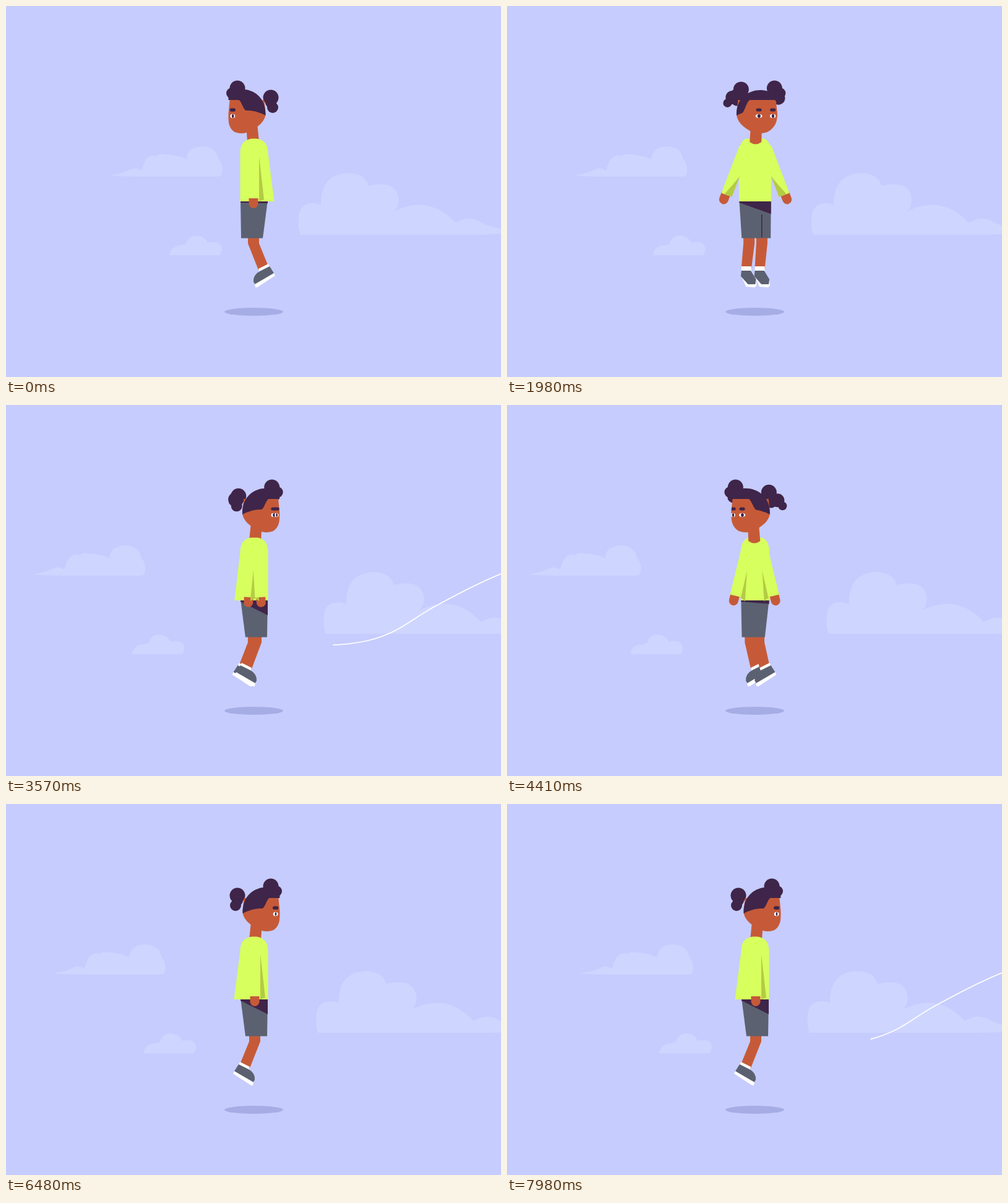
Recreate the animation shown at these times as an HTML page with a canvas. Size 800x600 px, loop 8 s.

```html
<!DOCTYPE html>
<html lang="en">
<head>
<meta charset="utf-8">
<title>Spin</title>
<style>
  html, body { margin: 0; width: 100%; height: 100%; overflow: hidden; background: #c6ccfd; }
  svg, canvas { position: absolute; left: 0; top: 0; width: 800px; height: 600px; }
  .cloud { fill: #ced5ff; }
  .swoosh { fill: none; stroke: #fff; stroke-width: 1.7; visibility: hidden; }
</style>
</head>
<body>
<svg viewBox="0 0 800 600">
  <path class="cloud" data-shift="-134" data-back="85" d="M166 274Q190 271 202 264Q209 260 219 266Q225 243 235 242Q241 241 245 243Q244 238 258 240Q278 241 292 248Q292 228 318 227Q341 229 343 247Q352 256 349 271Q348 276 341 276H215Q190 276 166 274Z"/>
  <path class="cloud" data-shift="-65" data-back="-47" d="M264 403Q267 387 284 387L291 385Q294 372 307 371Q322 372 326 383Q349 378 349 395L346 403Z"/>
  <path class="cloud" data-shift="44" data-back="31" d="M475 370Q465 320 494 319Q502 318 509 323Q507 272 554 270Q580 271 586 291Q632 280 635 314Q634 326 627 332Q684 304 727 351Q748 337 768 350Q790 361 826 364Q800 370 735 370Z"/>
  <ellipse cx="400.5" cy="494.5" rx="47.5" ry="6.5" fill="#a6ade5"/>
</svg>
<canvas width="800" height="600"></canvas>
<svg viewBox="0 0 800 600">
  <path class="swoosh" id="hill" d="M0 322C45 297 90 282 134 283C175 284 195 292 225 310C265 333 310 356 385 373C440 386 520 396 585 381C640 367 655 345 700 322C735 303 765 287 800 273"/>
  <path class="swoosh" id="loop" d="M0 506C60 503 120 495 162 478C200 462 219 445 219 422C217 400 200 389 182 389C155 390 133 412 133 436C134 455 148 468 162 478C210 505 265 516 330 516C450 515 590 475 677 418C730 385 770 350 800 310"/>
</svg>
<script>
const LOOP = 8000, STEP = 30, HALF_TURN = 24, CX = 401;
const SKIN = '#c65a38', HAIR = '#3f2549', SHIRT = '#d7ff5e', SHADE = '#b4cb45',
      SHORTS = '#5b6170', WHITE = '#fff', SOLE = '#eaa875', SKY = '#c6ccfd';
const ctx = document.querySelector('canvas').getContext('2d');
const clouds = document.querySelectorAll('.cloud');

const clamp = (v, lo = 0, hi = 1) => Math.max(lo, Math.min(hi, v));
const mix = (a, b, k) => a + (b - a) * k;
const smooth = v => { const k = clamp(v); return k * k * (3 - 2 * k); };

function fill(color) { ctx.fillStyle = color; ctx.fill(); }
function poly(color, ...pts) {
  ctx.beginPath();
  pts.forEach(([x, y]) => ctx.lineTo(x, y));
  ctx.closePath();
  fill(color);
}
function oval(color, x, y, rx, ry = rx) {
  ctx.beginPath();
  ctx.ellipse(x, y, rx, ry, 0, 0, 7);
  fill(color);
}
function pill(color, x, y, w, h, r) {
  ctx.beginPath();
  ctx.roundRect(x, y, w, h, r);
  fill(color);
}
function place(x, y, flip, draw) {
  ctx.save();
  ctx.translate(x, y);
  ctx.scale(flip, 1);
  draw();
  ctx.restore();
}

// A short rest in profile, a snap out of it, then a steady turn
function turnAngle(half) {
  if (half < 3) return 35 * clamp(half - 2);
  return half < 15 ? mix(35, 90, (half - 3) / 12) : mix(90, 180, (half - 15) / 9);
}

function pose(frame) {
  const phase = frame % (2 * HALF_TURN), half = phase % HALF_TURN;
  const yaw = (turnAngle(half) + (phase < HALF_TURN ? -90 : 90)) * Math.PI / 180;
  const flat = Math.abs(Math.cos(yaw)), side = Math.sin(yaw);
  return {
    yaw, flat, side,
    broad: flat ** 4,
    lead: Math.sign(side) || 1,
    front: Math.cos(yaw) > -.01,
    reach: 57 * flat + 22 * Math.sin(Math.PI * clamp((half - 3) / 12)),
    wedge: 3 + 21 * clamp(phase / 22) * clamp((48 - phase) / 6)
  };
}

function sideShoe() {
  poly(WHITE, [-8, -5], [8, 3], [6, 9], [-10, 0]);
  ctx.beginPath();
  ctx.moveTo(-10, -1);
  ctx.lineTo(6, 7);
  ctx.quadraticCurveTo(17, 13, 16, 24);
  ctx.lineTo(13, 29);
  ctx.lineTo(-17, 10);
  fill(SHORTS);
  poly(WHITE, [-17, 10], [14, 28], [13, 33], [10, 33], [-19, 14]);
}
function frontShoe(lean) {
  poly(WHITE, [-8, -1], [8, -1], [8, 7], [-8, 7]);
  poly(WHITE, [-9, 13], [lean - 7, 32], [lean + 7, 33], [lean + 10, 30], [lean + 9, 21]);
  poly(SHORTS, [-8, 6], [7, 6], [lean + 9, 20], [lean + 8, 28], [lean - 4, 28], [-9, 15]);
}
function backShoe(lean) {
  poly(WHITE, [-9, 1], [9, 1], [9, 9], [-9, 9]);
  poly(SHORTS, [-10, 7], [9, 7], [11, 14], [lean - 12, 27]);
  poly(WHITE, [-8, 14], [9, 11], [11, 15], [lean + 7, 33], [lean - 11, 34], [lean - 12, 30]);
  poly(SOLE, [-4, 15], [7, 15], [8, 18], [lean + 4, 32], [lean - 10, 33], [lean - 10, 29]);
}

function drawLegs({ flat, side, lead, front }) {
  const swing = CX - side * (6 + 9 * side ** 4);
  for (const leg of flat < .05 ? [0] : [-1, 1]) {
    const top = CX + side + 12 * flat * leg, foot = swing + 12.5 * flat * leg;
    poly(SKIN, [top - 9, 373], [top + 9, 373], [top + 9, 384], [foot + 8, 424 + 3 * side],
      [foot - 8, 424 - 3 * side], [top - 9, 384]);
    if (flat < .7) place(foot, 422, lead, sideShoe);
    else place(foot, 422, 1, () => (front ? frontShoe : backShoe)(side * 13));
  }
}

function drawShorts({ flat, broad, side, front, wedge }) {
  const waist = 22 + 6.5 * broad, hem = 17.5 + 10.5 * broad, mid = CX + 3.5 * side, bottom = 375.5;
  const l = CX - waist, r = CX + waist;
  poly(SHORTS, [l, 314], [r, 314], [mid + hem, bottom], [mid - hem, bottom]);
  if (flat > .97) {
    pill(HAIR, 396.5, 336, 4, 9, 0);
    pill(SKY, 396.5, 344, 4, bottom - 343, 0);
  } else if (flat > .7) {
    pill(HAIR, CX + side * (front ? 20 : -12), 337, 1.5, 37, 0);
  }
  poly(HAIR, [l, 316], [r, 316], [r, 316 + wedge], [l, 318]);
}

function drawNeck({ side }) {
  const top = CX + 4 * side, base = CX + 1.5 * side;
  ctx.beginPath();
  ctx.moveTo(top - 9, 190);
  ctx.lineTo(top + 9, 190);
  ctx.lineTo(base + 9.5, 220);
  ctx.quadraticCurveTo(base, 227, base - 9.5, 220);
  fill(SKIN);
}

function drawTorso({ flat, broad, side }) {
  const half = 22.5 + 6 * broad, flare = 10 * clamp((Math.abs(side) - .8) / .2);
  const l = CX - half, r = CX + half, collar = 16 * flat;
  ctx.beginPath();
  ctx.moveTo(l - (side > 0 ? flare : 0), 316);
  ctx.lineTo(l, 238);
  ctx.bezierCurveTo(l, 222, l + 8, 214.5, CX - collar, 214.5);
  ctx.lineTo(CX + collar, 214.5);
  ctx.bezierCurveTo(r - 8, 214.5, r, 222, r, 238);
  ctx.lineTo(r + (side < 0 ? flare : 0), 316);
  fill(SHIRT);
}

function onArm(arm, { flat, side, reach }, draw) {
  const shoulder = 20 * flat;
  place(CX + arm * shoulder + side, 229, arm, () => {
    ctx.rotate(-Math.asin(clamp((reach - shoulder) / 90, -1, 1)));
    draw(flat);
  });
}
function sleeve(flat) {
  if (flat < .05) poly(SHADE, [9, 14], [17, 84], [9, 87]);
  else if (flat < .7) poly(SHADE, [-7, 30], [-7, 82], [-17, 87]);
  poly(SHIRT, [-8, 0], [3, -11], [9, 1], [9, 82], [-9, 82]);
  if (flat >= .7) poly(SHADE, [-9, 46], [-3, 64], [4, 82], [-9, 82]);
}
function hand(flat) {
  pill(SKIN, 2 * flat - 7.5, 80, 15, 18, [0, 0, 7.5, 7.5]);
}

function drawBuns({ flat, broad, side, lead }) {
  const drift = 10 * side * flat, spread = clamp(Math.abs(side) * flat / .43);
  for (const s of [-1, 1]) {
    const trailing = s !== lead;
    const x = CX + 27 * s + drift, y = 133 + (trailing ? 15 * Math.abs(side) ** 3 : 0);
    oval(HAIR, x, y, 12.5);
    oval(HAIR, x + 9 * s * (trailing ? flat : 1), y + 8, 9);
    oval(HAIR, x + s * (3 + 6 * broad), y + 16, 9 + 3 * broad);
    if (trailing) {
      oval(HAIR, x + 14 * s * spread, y + 13 * spread, 11);
      oval(HAIR, x + 22 * s * spread, y + 22 * spread, 7);
    }
  }
}

// Lower edge of the hair at u, which runs from -1 to 1 across the face
function hairline(u, { side, lead, front }) {
  const low = 169 + 8 * u * u;
  if (!front) return mix(low - 2, 152, smooth((lead * u - 1.1 + .8 * Math.abs(side)) / .2));
  const lean = 1.05 * side * Math.abs(side);
  const sides = Math.max(smooth((u - .6 - lean) / .4), smooth((-u - .6 + lean) / .4));
  return mix(152, low, sides);
}

function drawHead(p) {
  const { yaw, side, front } = p;
  const mid = CX + side * (4 + 7.5 * side * side), half = 34 - 4 * side * side;
  const at = u => mid + half * u;
  drawBuns(p);

  ctx.beginPath();
  ctx.moveTo(at(-.93), 152);
  ctx.lineTo(at(-1), 174);
  ctx.bezierCurveTo(at(-1), 186, at(-.8 + .22 * side), 197, at(-.35 + .3 * side), 204);
  ctx.quadraticCurveTo(at(.28 * side), 208, at(.35 + .3 * side), 204);
  ctx.bezierCurveTo(at(.8 + .22 * side), 197, at(1), 186, at(1), 174);
  ctx.lineTo(at(.93), 152);
  fill(SKIN);

  if (front) {
    ctx.save();
    ctx.clip();
    for (const offset of [-.36, .36]) {
      const x = CX + 37 * Math.sin(yaw + offset), turn = Math.cos(yaw + offset);
      if (turn < -.4) continue;
      oval(WHITE, x, 178, 3 + 2.5 * Math.max(0, turn), 3.3);
      oval(HAIR, x + .3, 178, 1.4 + 1.2 * Math.max(0, turn), 3);
      pill(HAIR, x - 4.5, 165.5, 9, 5, 2.5);
    }
    ctx.restore();
  }

  ctx.beginPath();
  for (let u = -1; u <= 1.01; u += .05) ctx.lineTo(at(u), hairline(u, p));
  ctx.bezierCurveTo(at(1.06), 126, at(-1.06), 126, at(-1), hairline(-1, p));
  fill(HAIR);
}

function drawFigure(frame) {
  const p = pose(frame), collar = p.front && p.flat > .3;
  const arms = p.flat < .05 ? [1] : [-1, 1];
  ctx.clearRect(0, 0, 800, 600);
  drawLegs(p);
  drawShorts(p);
  if (!collar) drawNeck(p);
  drawTorso(p);
  for (const part of [hand, sleeve]) arms.forEach(arm => onArm(arm, p, part));
  if (collar) drawNeck(p);
  drawHead(p);
}

// Clouds ease one way, then gather speed on the way back
function drawClouds(t) {
  const away = (1 - Math.cos(Math.PI * clamp(t / 4300))) / 2;
  const home = (Math.max(0, t - 4300) / 3680) ** 1.35;
  for (const cloud of clouds) {
    const shift = +cloud.dataset.shift, back = Math.abs(cloud.dataset.back);
    const x = shift * away - Math.sign(shift) * back * home;
    cloud.setAttribute('transform', `translate(${x} 0)`);
  }
}

function drawSwoosh(id, ...runs) {
  return t => {
    const path = document.getElementById(id), total = path.getTotalLength();
    const run = runs.find(r => t > r.draw && t < r.wipe + r.out);
    path.style.visibility = run ? 'visible' : 'hidden';
    if (!run) return;
    const head = clamp((t - run.draw) / run.in) * total;
    const tail = clamp((t - run.wipe) / run.out) * total;
    path.style.strokeDasharray = `0 ${tail} ${Math.max(0, head - tail)} ${total * 2}`;
  };
}
const swooshes = [
  drawSwoosh('hill', { draw: 2460, in: 500, wipe: 3245, out: 500 },
    { draw: 7330, in: 320, wipe: 7620, out: 500 }),
  drawSwoosh('loop', { draw: 5062, in: 500, wipe: 5640, out: 500 })
];

function render() {
  const frame = Math.floor(performance.now() % LOOP / STEP), t = frame * STEP;
  drawClouds(t);
  drawFigure(frame);
  swooshes.forEach(draw => draw(t));
  requestAnimationFrame(render);
}
render();
</script>
</body>
</html>
```
